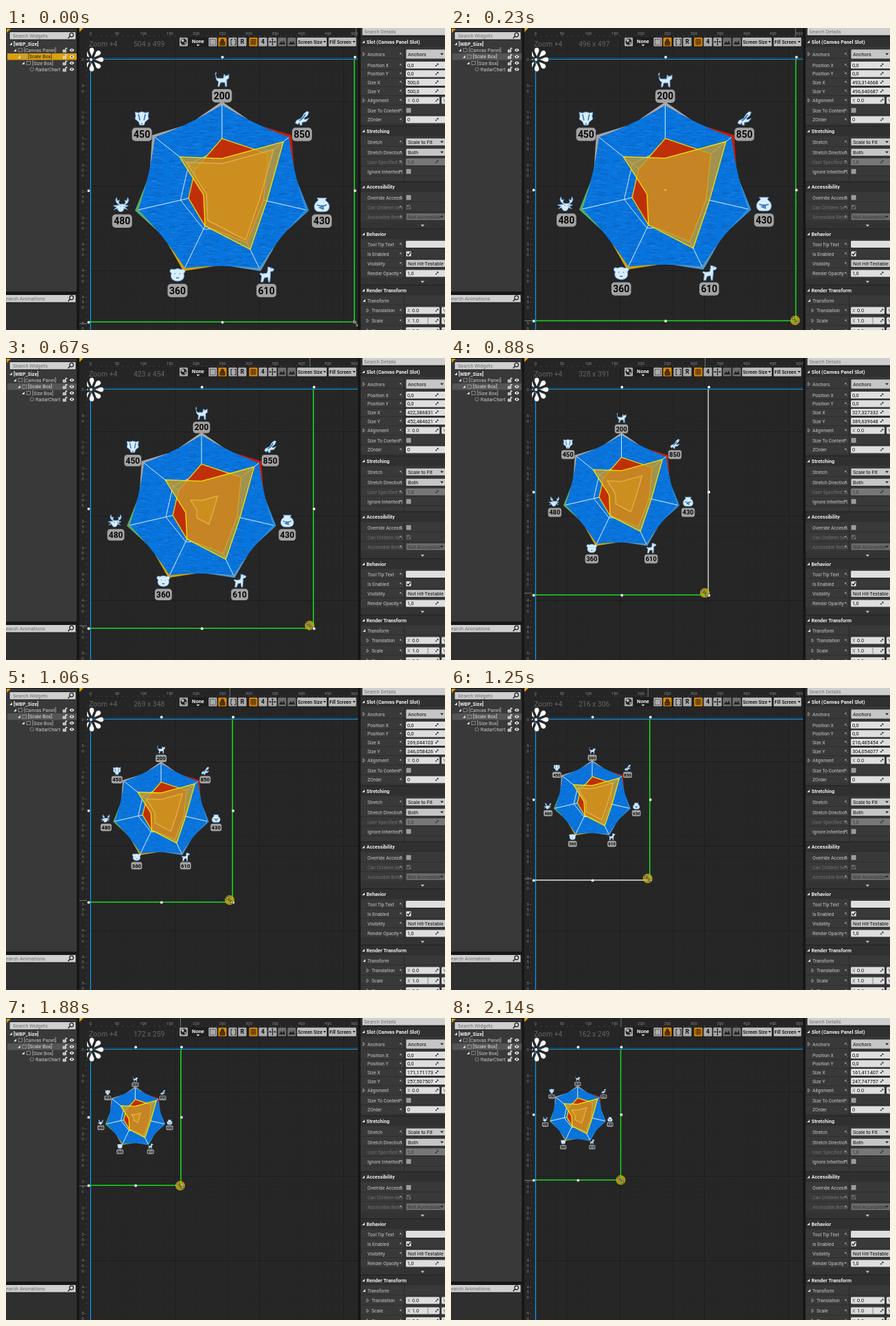
Write an HTML page that moves like this. It is 640x440 px and loops after 2210 ms.

```html
<!DOCTYPE html>
<html lang="en">
<head>
<meta charset="utf-8">
<title>Radar chart in a scale box</title>
<style>
html, body { margin: 0; width: 100%; height: 100%; overflow: hidden; background: #262626; }
svg { display: block; width: 640px; height: 440px; }
text { font-family: Roboto, "Liberation Sans", sans-serif; font-size: 7.2px; fill: #c8c8c8; white-space: pre; }
.bold { font-weight: 700; fill: #eee; }
.label { font-size: 6.8px; }
.thin { vector-effect: non-scaling-stroke; }
.mid { text-anchor: middle; }
</style>
</head>
<body>
<svg id="stage" viewBox="0 0 640 440">
  <defs>
    <pattern id="waves" width="80" height="48" patternUnits="userSpaceOnUse">
      <rect width="80" height="48" fill="#0875de"/>
    </pattern>
    <pattern id="grid" x="123" y="45.5" width="15.38" height="15.38" patternUnits="userSpaceOnUse">
      <path d="M0 .5H15.38M.5 0V15.38" stroke="#222" stroke-width=".8"/>
    </pattern>
    <pattern id="bigGrid" x="123" y="-16" width="123.04" height="123.04" patternUnits="userSpaceOnUse">
      <path d="M0 .5H123.04M.5 0V123.04" stroke="#1c1c1c"/>
    </pattern>
    <clipPath id="labelClip"><rect x="515" width="63" height="440"/></clipPath>
    <clipPath id="viewClip"><rect x="107" width="408" height="440"/></clipPath>
  </defs>
</svg>
<script>
const stage = document.getElementById('stage');

function el(parent, tag, attrs = {}, text) {
  const node = document.createElementNS('http://www.w3.org/2000/svg', tag);
  for (const key in attrs) node.setAttribute(key, attrs[key]);
  if (text !== undefined) node.textContent = text;
  parent.appendChild(node);
  return node;
}
const set = (node, attrs) => { for (const key in attrs) node.setAttribute(key, attrs[key]); };
const group = (parent, attrs) => el(parent, 'g', attrs);
const rect = (p, x, y, width, height, fill, more) => el(p, 'rect', { x, y, width, height, fill, ...more });
const path = (p, d, fill = 'none', stroke = 'none', more) => el(p, 'path', { d, fill, stroke, ...more });
const text = (p, x, y, s, more) => el(p, 'text', { x, y, ...more }, s);
const dot = (p, cx, cy, r, fill, more) => el(p, 'circle', { cx, cy, r, fill, ...more });

let seed = 7;
const random = () => (seed = seed * 16807 % 2147483647) / 2147483647;

// ---------- Canvas view ----------
const UNIT = 0.769, LEFT = 123.3, TOP = 45.8;
const view = group(stage, { 'clip-path': 'url(#viewClip)' });
rect(view, 107, 0, 408, 440, '#262626');
rect(view, 107, 0, 408, 440, 'url(#grid)');
rect(view, 107, 0, 408, 440, 'url(#bigGrid)');
rect(view, 118, 43, 395, 1, '#0c4674');
rect(view, 118, 45, 395, 1, '#1b96dc');
rect(view, 122, 44, 1, 396, '#0c4674');
rect(view, 123, 44, 1, 396, '#1b96dc');

// ---------- Radar chart ----------
const waves = document.getElementById('waves');
for (let k = 0; k < 110; k++) {
  const w = 5 + random() * 9, x = random() * (80 - w), y = 1 + random() * 46, lift = random() * 4 - 2;
  path(waves, `M${x} ${y}q${w / 4} ${lift} ${w / 2} 0t${w / 2} 0`, 'none', k % 3 ? '#0761c0' : '#1785ee', { 'stroke-width': .9 });
}

const chart = group(view);
const polar = (k, r) => {
  const a = k * 2 * Math.PI / 7;
  return [r * Math.sin(a), -r * Math.cos(a)];
};
const polygon = radii => 'M' + radii.map((r, k) => polar(k, r).map(v => v.toFixed(2))).join('L') + 'Z';
const R = 125, DIP = 107;
const edgePoint = (k, t) => {
  const a = polar(k, R), c = polar(k + .5, DIP), b = polar(k + 1, R);
  return a.map((v, i) => (1 - t) ** 2 * v + 2 * t * (1 - t) * c[i] + t * t * b[i]);
};

const tips = ['#a9a9a9', '#c41c08', '#2c8fdc', '#5598c4', '#d2a204', '#58aa6c', '#a4a4a4'];
tips.forEach((color, k) => {
  const a = edgePoint(k - 1, .6), b = edgePoint(k, .4);
  path(chart, `M${a}L${polar(k, R + 5)}L${b}L0 0Z`, color);
});
let sea = `M${polar(0, R)}`;
for (let k = 0; k < 7; k++) sea += `Q${polar(k + .5, DIP)} ${polar(k + 1, R)}`;
path(chart, sea + 'Z', 'url(#waves)');
for (let k = 0; k < 7; k++)
  path(chart, `M0 0L${polar(k, R)}`, 'none', '#dcecff', { 'stroke-width': 1, class: 'thin' });
path(chart, polygon(Array(7).fill(62)), 'none', '#d0e6ff', { 'stroke-width': 1, class: 'thin' });

const line = { 'stroke-width': 1.3, class: 'thin' };
path(chart, polygon([76, 86, 62, 84, 57, 50, 50]), '#bf2f08', '#f0d400', line);
const goldShape = polygon([47, 114.5, 67, 95, 57, 27.5, 79]);
path(chart, goldShape, '#c99a2c', '#f4e400', { ...line, 'fill-opacity': .8 });
const ripple = path(chart, goldShape, '#d69a1c', '#e0b040', { 'fill-opacity': .5, 'stroke-width': 1.4, class: 'thin' });

const icons = [
  // cat
  'M-9-6q-2-4 1-5 M-9-6q1 4 3 4h8l1-6 2 2h3l2-2v6l-3 2v10h-2l-1-6h-6l-2 6h-2l1-7q-4-2-4-7z',
  // crocodile
  'M10-9l-3-1-4 3-4 7-7 3-2 4 4 2 2-3 1 4 3 0 0-4 6-1 4-5-6 2-1-2 5-4z',
  // fishbowl
  'M-7-10h14l-2 3q6 4 6 9 0 8-8 8h-6q-8 0-8-8 0-5 6-9z',
  // dog
  'M2-11l4 1 5 2-1 3-4 1v5l-1 10h-2l-1-7-5 1-2 6h-3l1-9-3-3 2-1 3 1 6-1 1-5z',
  // bear
  'M-6-7a3 3 0 1 0-3 5q-3 11 9 12 12-1 9-12a3 3 0 1 0-3-5q-6-3-12 0z',
  // crab
  'M-4 0l-4-3q-3-4 0-8l1 5 3-1-1 4 2 2h6l2-2-1-4 3 1 1-5q3 4 0 8l-4 3 5 1-1 1-4 1 4 4-5-2q-1 5-5 5t-5-5l-5 2 4-4-4-1-1-1z',
  // badger
  'M-10-9l5 1q5-3 10 0l5-1-1 6 1 4-5 4-2 5h-6l-2-5-5-4 1-4z'
];
const details = [
  'M4-5h1', 'M-4 4l5-4 4-6', 'M-7 0q7 3 14 0M-3 4l5-2v4z', 'M6-8h1',
  'M-4-1h1M3-1h1M-2 5h4', 'M-3 2h1M2 2h1', 'M-5-6l2 9M5-6l-2 9M-1 8h2'
];
[200, 850, 430, 610, 360, 480, 450].forEach((value, k) => {
  const [x, y] = polar(k, 149.3);
  const mark = group(chart, { transform: `translate(${x} ${y - 12.5})` });
  path(mark, icons[k], '#d9edff', '#5f9fd8', { 'stroke-width': .9, 'stroke-linejoin': 'round' });
  path(mark, details[k], 'none', '#2f73b8', { 'stroke-width': 1.6 });
  rect(chart, x - 14.5, y + 1.2, 29, 19.5, '#a2a2a2', { rx: 5 });
  text(chart, x, y + 16, value, { class: 'mid', style: 'font-size:14px;font-weight:700;fill:#080808' });
});

// ---------- Selection frame, anchor, pointer ----------
const rightEdge = path(view, '', 'none', '#fff', { 'stroke-width': 1.6 });
const bottomEdge = path(view, '', 'none', '#fff', { 'stroke-width': 1.6 });
const anchor = group(view, { transform: 'translate(125 46)' });
for (let k = 0; k < 8; k++)
  path(anchor, 'M0-4L3.6-12.5Q4-17.5 0-17.5T-3.6-12.5Z', '#fff', '#222', { 'stroke-width': .6, transform: `rotate(${k * 45})` });
dot(anchor, -1, 0, 2.6, '#fff', { stroke: '#222' });
const handles = Array.from({ length: 7 }, () => dot(view, 0, 0, 1.9, '#fff'));

const pointer = group(view);
const halo = dot(pointer, 0, 0, 7, '#c9b40c', { 'fill-opacity': .8 });
const resize = 'M-3-3L3 3M-3.5-.5V-3.5H-.5M3.5 .5V3.5H.5';
path(pointer, resize, 'none', '#222', { 'stroke-width': 2 });
path(pointer, resize, 'none', '#f4f0c0', { 'stroke-width': .8 });

// ---------- Rulers ----------
rect(view, 107, 0, 11, 440, '#252525');
rect(view, 107, 0, 408, 13, '#252525');
const small = { class: 'mid', style: 'font-size:6px;fill:#858585' };
for (let v = 0; v <= 500; v += 10) {
  const x = LEFT + v * UNIT, y = TOP + v * UNIT, size = v % 50 ? 2 : 4;
  rect(view, x, 13 - size, .7, size, '#505050');
  rect(view, 118 - size, y, size, .7, '#505050');
  if (v % 50 === 0) {
    text(view, x, 10, v, small);
    [...String(v)].forEach((c, k) => text(view, 112, y + 2 + k * 7.6, c, small));
  }
}
path(view, 'M107 0h6l-6 6z', '#d99a10');
const markX = rect(view, 0, 0, 1, 13, '#6f7a6f');
const markY = rect(view, 107, 0, 11, 1, '#6f7a6f');

// ---------- Toolbar ----------
const big = { style: 'font-size:10.4px;fill:#646464' };
text(view, 121, 27, 'Zoom +4', big);
const sizeLabel = text(view, 186, 27, '', big);
const button = (x, w, fill = '#a9a9a9') => rect(view, x, 13.5, w, 13.5, fill, { rx: 1.5, stroke: '#151515', 'stroke-width': .7 });
rect(view, 252, 13, 259, 14.5, '#1e1e1e', { rx: 2 });
button(252.5, 13);
dot(view, 259, 20, 4.5, '#222');
path(view, 'M255 18l3-2 2 2-2 3zM260 21l3-1-2 4z', '#bbb');
text(view, 280, 22, 'None', { class: 'mid bold', style: 'font-size:7.5px' });
path(view, 'M277.5 24h5l-2.5 2.5z', '#ddd');
[295, 309, 324, 338, 354, 368, 382, 396, 410].forEach((x, k) => button(x, 13, k === 1 || k === 4 ? '#d8860b' : k > 6 ? '#6c6c6c' : '#a9a9a9'));
path(view, 'M297.5 16.5h8v8h-8z', 'none', '#444', { 'stroke-dasharray': '1.5 1' });
path(view, 'M312 20h7v5h-7zM313.5 20v-2a2 2 0 0 1 4 0v2', '#3a2500', '#3a2500', { 'fill-opacity': .8 });
path(view, 'M330 16.5h-2v8h2M333 16.5h2v8h-2', 'none', '#222');
const dark = { class: 'mid', style: 'font-size:8.5px;fill:#111;font-weight:700' };
text(view, 344.5, 23.4, 'R', dark);
path(view, 'M357 16.5h7v7.5h-7zM359.4 16.5v7.5M361.7 16.5v7.5M357 19h7M357 21.5h7', 'none', '#3a2500', { 'stroke-width': .9 });
text(view, 374.5, 23.4, '4', dark);
path(view, 'M388.5 15.5v9.5M383.7 20.2h9.5', 'none', '#222');
path(view, 'M386.9 17l1.6-2 1.6 2zM386.9 23.5l1.6 2 1.6-2zM385.4 18.6l-2 1.6 2 1.6zM391.6 18.6l2 1.6-2 1.6z', '#222');
path(view, 'M398 24l3-5 2 3 2-4 2 6zM412 24l3-5 2 3 2-4 2 6z', '#222');
[[424, 44, 'Screen Size'], [470, 41, 'Fill Screen']].forEach(([x, w, s]) => {
  button(x, w, '#bcbcbc');
  text(view, x + 1.5, 22.8, s, { style: 'fill:#0c0c0c;font-size:6.8px;font-weight:500' });
  path(view, `M${x + w - 5.5} 19h4l-2 2.5z`, '#111');
});

// ---------- Hierarchy panel ----------
const left = group(stage);
rect(left, 0, 0, 107, 440, '#171717');
rect(left, 0, 1, 103, 383, '#393939');
rect(left, 0, 388, 103, 52, '#2f2f2f');
path(left, 'M1 1h6l-6 6z', '#d99a10');
const search = (p, x, y, w, s, tx) => {
  rect(p, x, y, w, 11.5, '#cfcfcf', { rx: 1.5, stroke: '#191919' });
  text(p, tx, y + 8.5, s, { style: 'fill:#707070;font-size:7.3px' });
};
const lens = y => {
  dot(left, 95.5, y, 2.8, 'none', { stroke: '#1c1c1c', 'stroke-width': 1.2 });
  path(left, `M93.5 ${y + 2}l-3 3`, 'none', '#1c1c1c', { 'stroke-width': 1.5 });
};
search(left, 5, 5.5, 97, 'Search Widgets', 10);
search(left, -3, 388.5, 105, 'earch Animations', 0);
lens(10);
lens(393);
const selected = rect(left, 2, 37, 101, 9.5, '#555');
const arrow = (p, x, y) => path(p, `M${x} ${y + 2}h4v-4z`, '#ddd');
const tree = [[11, '[WBP_Size]', 23], [26, '[Canvas Panel]', 32.3], [32, '[Scale Box]', 41.7], [38, '[Size Box]', 51], [43, 'RadarChart', 60.2]];
const rows = tree.map(([x, s, y], k) => {
  if (k < 4) arrow(left, x - (k ? 15 : 6), y);
  if (k) rect(left, x - 8, y - 2.5, 5.5, 5, 'none', { stroke: '#999', 'stroke-width': .8, rx: k === 4 ? 3 : 0 });
  if (k) {
    path(left, `M83 ${y - .5}h4.5v3.5h-4.5zM86.5 ${y - .5}v-1.5a1.4 1.4 0 0 1 2.8 0`, '#ddd', '#ddd', { 'stroke-width': .7, 'fill-opacity': .8 });
    path(left, `M92.5 ${y}q3.5-4.5 7 0q-3.5 4.5-7 0z`, '#eee');
    dot(left, 96, y, 1.1, '#333');
  }
  return text(left, x, y + 2.5, s, k ? {} : { class: 'bold' });
});

// ---------- Details panel ----------
const side = group(stage);
rect(side, 513, 0, 127, 440, '#171717');
rect(side, 517, 0, 123, 440, '#393939');
search(side, 519, -.5, 124, 'Search Details', 522);
const labels = group(side, { 'clip-path': 'url(#labelClip)' });
const ink = dim => `fill:${dim ? '#3a3a3a' : '#0c0c0c'}`;
const spin = y => path(side, `M626.5 ${y + 1.5}l3.5-3.5M628 ${y - 2}h2v2M626.5 ${y}v1.5h1.5`, 'none', '#333', { 'stroke-width': .9 });
const drawValue = {
  field(y, s, dim) {
    rect(side, 583, y - 5, 60, 10, dim ? '#777' : '#dedede', { rx: 1.5 });
    if (s) spin(y);
    return text(side, 585, y + 2.5, s, { style: ink(dim) });
  },
  combo(y, s, dim) {
    const h = s === 'Anchors' ? 14 : 11;
    rect(side, 583, y - h / 2, 60, h, dim ? '#686868' : '#c6c6c6', { rx: 1.5, stroke: '#1c1c1c', 'stroke-width': .6 });
    text(side, 586, y + 2.5, s, { style: ink(dim) });
    if (s.length < 15) path(side, `M633 ${y - 1.2}h5l-2.5 2.8z`, '#222');
  },
  check(y, s, dim) {
    rect(side, 583, y - 4, 8, 8, dim ? '#686868' : s ? '#e4e4e4' : '#9c9c9c', { rx: 1, stroke: '#222', 'stroke-width': .7 });
    if (s) path(side, `M584.8 ${y}l1.8 2 3-4.4`, 'none', dim ? '#333' : '#111', { 'stroke-width': 1.3 });
  },
  axis(y, s) {
    [['X', 583, 49], ['Y', 635, 30]].forEach(([c, x, w]) => {
      rect(side, x, y - 5, w, 10, '#dedede', { rx: 1.5 });
      text(side, x + 2, y + 2.5, c, { style: 'fill:#666' });
    });
    text(side, 592, y + 2.5, s, { style: ink() });
    if (s === '1.0') rect(side, 614.5, y - 5, 1, 10, '#888');
    spin(y);
  }
};
const values = {};
const addRow = (y, label, kind, value, dim, tree) => {
  rect(side, 517, y + 6.3, 123, .7, '#2a2a2a');
  text(labels, tree === 2 ? 533 : 527, y + 2.5, label, { class: 'label', style: dim ? 'fill:#707070' : '' });
  if (tree) path(side, tree === 2 ? `M526 ${y - 2.5}l3 2.5-3 2.5z` : `M520.5 ${y - 2.5}l3 2.5-3 2.5z`, 'none', '#bbb', { 'stroke-width': .7 });
  if (!kind) return;
  path(side, `M574.5 ${y - 1.5}h2l-2 2zM575.5 ${y - .5}l2.5 2.5`, '#aaa', '#aaa', { 'stroke-width': .5 });
  values[label] = drawValue[kind](y, value, dim);
};
[
  [38, 'Anchors', 'combo', 'Anchors', 0, 1],
  [54, 'Position X', 'field', '0,0'],
  [66.5, 'Position Y', 'field', '0,0'],
  [79, 'Size X', 'field', '500,0'],
  [92, 'Size Y', 'field', '500,0'],
  [105.5, 'Alignment', 'axis', '0.0', 0, 1],
  [120, 'Size To Content', 'check', 0],
  [133.5, 'ZOrder', 'field', '0'],
  [166, 'Stretch', 'combo', 'Scale to Fit'],
  [181, 'Stretch Direction', 'combo', 'Both'],
  [195, 'User Specified Scale', 'field', '1,0', 1],
  [209, 'Ignore Inherited Scale', 'check', 0],
  [247, 'Override Accessible', 'check', 0],
  [261, 'Can Children be Accessible', 'check', 1, 1],
  [275, 'Accessible Behavior', 'combo', 'Not Accessible', 1],
  [315, 'Tool Tip Text', 'field', ''],
  [329, 'Is Enabled', 'check', 1],
  [343, 'Visibility', 'combo', 'Not Hit-Testable (Self)'],
  [357.5, 'Render Opacity', 'field', '1,0'],
  [397, 'Transform'],
  [411.5, 'Translation', 'axis', '0.0', 0, 2],
  [426.5, 'Scale', 'axis', '1.0', 0, 2],
  [441, 'Shear', 'axis', '0.0', 0, 2]
].forEach(row => addRow(...row));
arrow(side, 520, 397);
rect(side, 580, 28, .8, 412, '#242424');
[[20, 'Slot (Canvas Panel Slot)'], [150, 'Stretching'], [231.5, 'Accessibility'], [300, 'Behavior'], [382, 'Render Transform']].forEach(([y, s]) => {
  rect(side, 517, y - 7.5, 123, 15, '#303030');
  rect(side, 517, y - 8, 123, 1, '#202020');
  arrow(side, 519, y);
  text(side, 525.5, y + 2.6, s, { class: 'bold' });
});
for (const y of [288, 370]) {
  rect(side, 517, y - 5, 123, 9, '#333');
  path(side, `M604.5 ${y - 1.5}h5.5l-2.75 3z`, '#ccc');
}

// ---------- Motion ----------
const LOOP = 2210, CHART_LAG = 20;
const steps = [0, 50, 110, 170, 230, 300, 360, 420, 480, 550, 620, 680, 750, 810, 880, 950, 1010, 1060, 1110,
  1180, 1250, 1320, 1380, 1440, 1500, 1570, 1620, 1680, 1750, 1820, 1880, 1950, 2010, 2080, 2140];
// time, box width and height, label width and height, pointer offset
const keys = [
  [0, 500, 500, 504, 499, 2, 2],
  [480, 461.7117, 477.477478, 462, 479, -5, -4],
  [880, 327.327332, 389.639648, 328, 391, -5, -3],
  [1250, 216.465454, 304.054077, 216, 306, -3, -2.5],
  [1500, 189.189178, 277.027039, 190, 279, -1.5, -.5],
  [1880, 171.171173, 257.507507, 172, 259, -1, .5],
  [2140, 161.411407, 247.747757, 162, 249, 0, 0]
];
const slope = (k, c) => k === 0 ? 0 : (([a, b]) => (b[c] - a[c]) / (b[0] - a[0]))([keys[k - 1], keys[Math.min(k + 1, 6)]]);

function pose(t) {
  let k = 0;
  while (k < 5 && t >= keys[k + 1][0]) k++;
  const a = keys[k], b = keys[k + 1], d = b[0] - a[0], u = (t - a[0]) / d;
  return [1, 2, 3, 4, 5, 6].map(c =>
    a[c] * (1 + 2 * u) * (1 - u) ** 2 + b[c] * u * u * (3 - 2 * u) +
    d * u * (1 - u) * (slope(k, c) * (1 - u) - slope(k + 1, c) * u));
}
const decimal = v => {
  const s = v.toFixed(6).replace(/0+$/, '').replace('.', ',');
  return s.endsWith(',') ? s + '0' : s;
};

function draw(t) {
  const [w, h, lw, lh, dx, dy] = pose(t);
  // The height readout leads the frame by a constant margin.
  const right = LEFT + w * UNIT, bottom = TOP + (lh - 1.6) * UNIT;
  const cx = (LEFT + right) / 2, cy = (TOP + bottom) / 2;

  const [fit] = pose(Math.max(0, t - CHART_LAG));
  set(chart, { transform: `translate(${cx - .7} ${cy}) scale(${fit / 500})` });
  set(ripple, { transform: `scale(${(t / 1333 + .84) % 1})` });

  const green = '#18d822', pale = '#c4c8c4';
  set(rightEdge, { d: `M${right} ${TOP}V${bottom}`, stroke: t >= 810 && t < 1060 ? pale : green });
  set(bottomEdge, { d: `M${LEFT - 3} ${bottom}H${right}`, stroke: t >= 1180 && t < 1440 ? pale : green });
  const l = 120.5, top = 42.5, r = right + 1, b = bottom + .5;
  [[cx, top], [r, top], [l, cy], [r, cy], [l, b], [cx, b], [r, b]].forEach(([x, y], k) => set(handles[k], { cx: x, cy: y }));

  set(pointer, { transform: `translate(${right + dx} ${bottom + dy})` });
  const idle = t < 50;
  set(halo, { visibility: idle ? 'hidden' : 'visible' });
  set(markX, { x: right + dx });
  set(markY, { y: bottom + dy });
  set(selected, { fill: idle ? '#dca00c' : '#555' });
  rows[2].style.fill = idle ? '#1a1a1a' : '#ddd';

  sizeLabel.textContent = `${Math.round(lw)} x ${Math.round(lh)}`;
  values['Size X'].textContent = decimal(w);
  values['Size Y'].textContent = decimal(h);
}

const start = performance.now();
function tick() {
  const t = (performance.now() - start) % LOOP;
  draw(steps.findLast(s => s <= t));
  requestAnimationFrame(tick);
}
tick();
</script>
</body>
</html>
```
